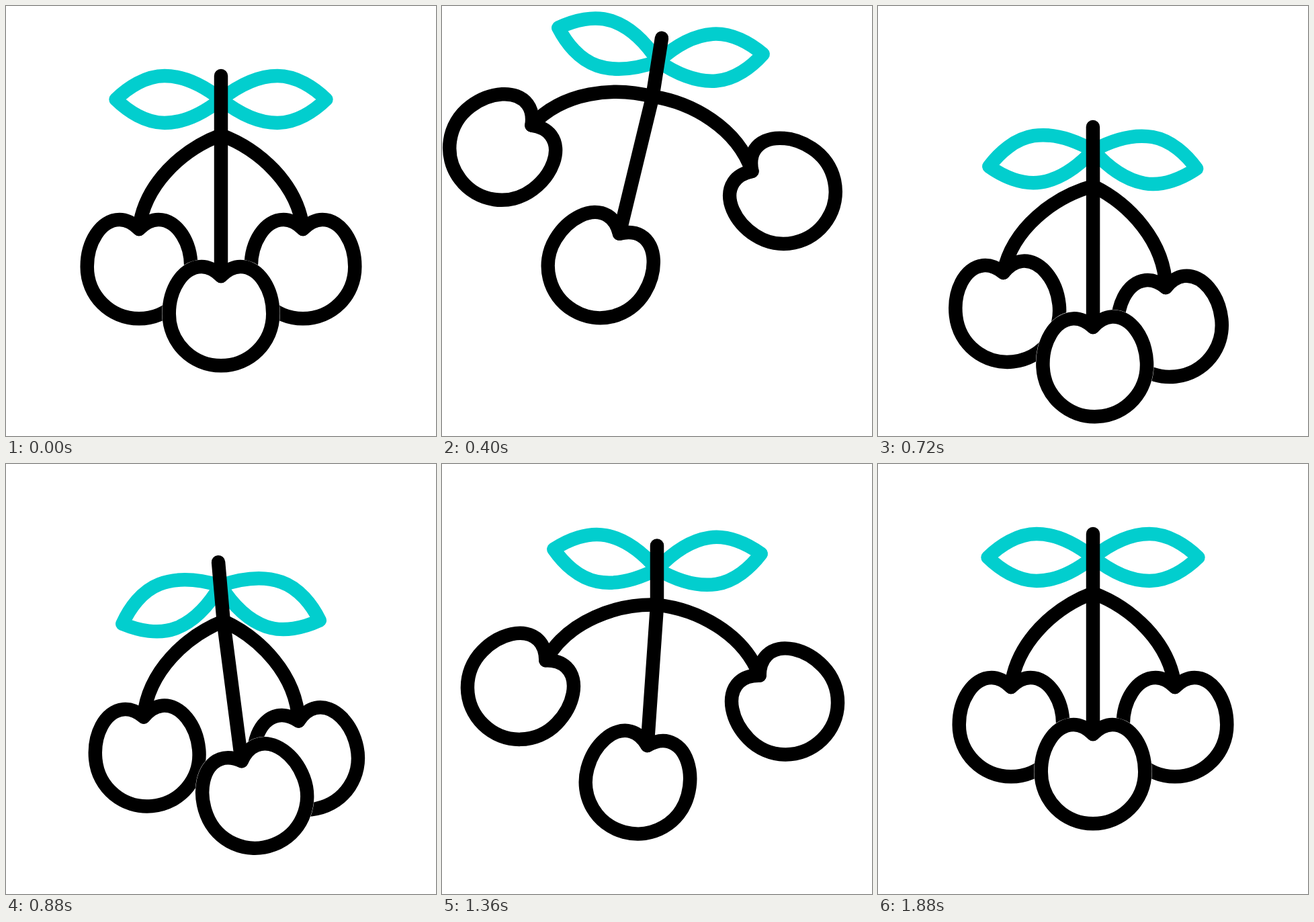
These frames come from a looping animation (640x640 px, 2000 ms). An HTML page:

```html
<!DOCTYPE html>
<html lang="en">
<head>
<meta charset="utf-8">
<title>Cherries</title>
<style>
  html, body { margin: 0; width: 100%; height: 100%; overflow: hidden; background: #fff; }
  svg {
    display: block; width: 100%; height: 100%;
    fill: none; stroke: #000; stroke-width: 20.5; stroke-linecap: round; stroke-linejoin: round;
  }
  .leaf { stroke: #02cece; }
  .cherry { fill: #fff; }
  .halo { stroke: #fff; stroke-width: 21.2; }
</style>
</head>
<body>
<svg viewBox="0 0 640 640">
  <defs>
    <path id="shape" d="M0 0C-9 -9 -19 -14 -29 -14C-57 -14 -77.3 20 -77.3 56C-77.3 99 -43 133.3 0 133.3C43 133.3 77.3 99 77.3 56C77.3 20 57 -14 29 -14C19 -14 9 -9 0 0Z"/>
    <g id="cherry" class="cherry"><use href="#shape" class="halo"/><use href="#shape"/></g>
    <path id="leaf" class="leaf" d="M0 0C-28 -22 -56 -35 -84 -35C-112 -35 -138 -18 -156.5 0C-138 18 -112 35 -84 35C-56 35 -28 22 0 0Z"/>
    <path id="arm" d="M0 -2C-56 19 -114 70 -122 138"/>
  </defs>
  <g id="plant">
    <g id="crown">
      <g id="leafL"><use href="#leaf"/></g>
      <g id="leafR"><use href="#leaf" transform="scale(-1 1)"/></g>
    </g>
    <g id="armL"><g id="cherryL"><use href="#cherry"/></g><use href="#arm"/></g>
    <g id="armR"><g id="cherryR"><use href="#cherry"/></g><use href="#arm" transform="scale(-1 1)"/></g>
    <g id="armM"><g id="cherryM"><use href="#cherry"/></g><path d="M0 0V208"/></g>
    <g id="stem"><path d="M0 0V-90"/></g>
  </g>
</svg>
<script>
  const LOOP = 2000, STEP = 40;

  // Eases in and out between turning points, given as [time, value].
  function ease(t, ...points) {
    const i = points.findIndex(p => p[0] > t);
    if (i < 0) return points[points.length - 1][1];
    if (i === 0) return points[0][1];
    const [t0, a] = points[i - 1], [t1, b] = points[i];
    return a + (b - a) * (1 - Math.cos(Math.PI * (t - t0) / (t1 - t0))) / 2;
  }

  // Pendulum that turns at a, b and c, and starts and ends at rest.
  const swing = (t, a, b, c) => ease(t, [0, 0], [475, a], [880, b], [1210, c], [1880, 0]);

  const el = id => document.getElementById(id);
  const place = (id, x, y, angle) =>
    el(id).setAttribute("transform", `translate(${x} ${y}) rotate(${angle})`);

  function hang(side, x, y, armAngle, cherryAngle) {
    place("arm" + side, 0, 0, armAngle);
    place("cherry" + side, x, y, cherryAngle - armAngle);
  }

  function draw(t) {
    const height = ease(t, [0, 194], [385, 136], [715, 270], [1150, 161.5], [1500, 238], [1880, 194]);
    const stem = swing(t, 9.5, -5, 0);
    place("plant", 320 - 0.78 * stem, height, 0);
    place("stem", 0, 0, stem);

    const rad = stem * Math.PI / 180;
    const flap = swing(t, 12, -20.3, 11);
    const tilt = ease(t, [0, 0], [300, 8], [880, -1], [1180, 4], [1560, -2], [1880, 0]);
    place("crown", 55 * Math.sin(rad), -55 * Math.cos(rad), 0);
    place("leafL", 0, 0, tilt + flap);
    place("leafR", 0, 0, tilt - flap);

    const flare = ease(t, [0, 0], [365, 24.3], [830, -4], [1205, 25], [1660, 0]);
    const fling = ease(t, [60, 0], [400, 55], [700, 0], [820, 0], [1225, 58], [1640, 0]);
    const armTilt = swing(t, 12.5, 1.5, 4.6);
    const cherryTilt = swing(t, -2, -8.5, 0);
    hang("L", -122, 138, armTilt + flare, cherryTilt + fling);
    hang("R", 122, 138, armTilt - flare, cherryTilt - fling);
    hang("M", 0, 208, swing(t, 14.5, -7.4, 4.5), swing(t, 33, -21, 17));
  }

  const start = performance.now();
  function tick() {
    const t = (performance.now() - start) % LOOP;
    draw(Math.floor(t / STEP) * STEP);
    requestAnimationFrame(tick);
  }
  draw(0);
  requestAnimationFrame(tick);
</script>
</body>
</html>
```
